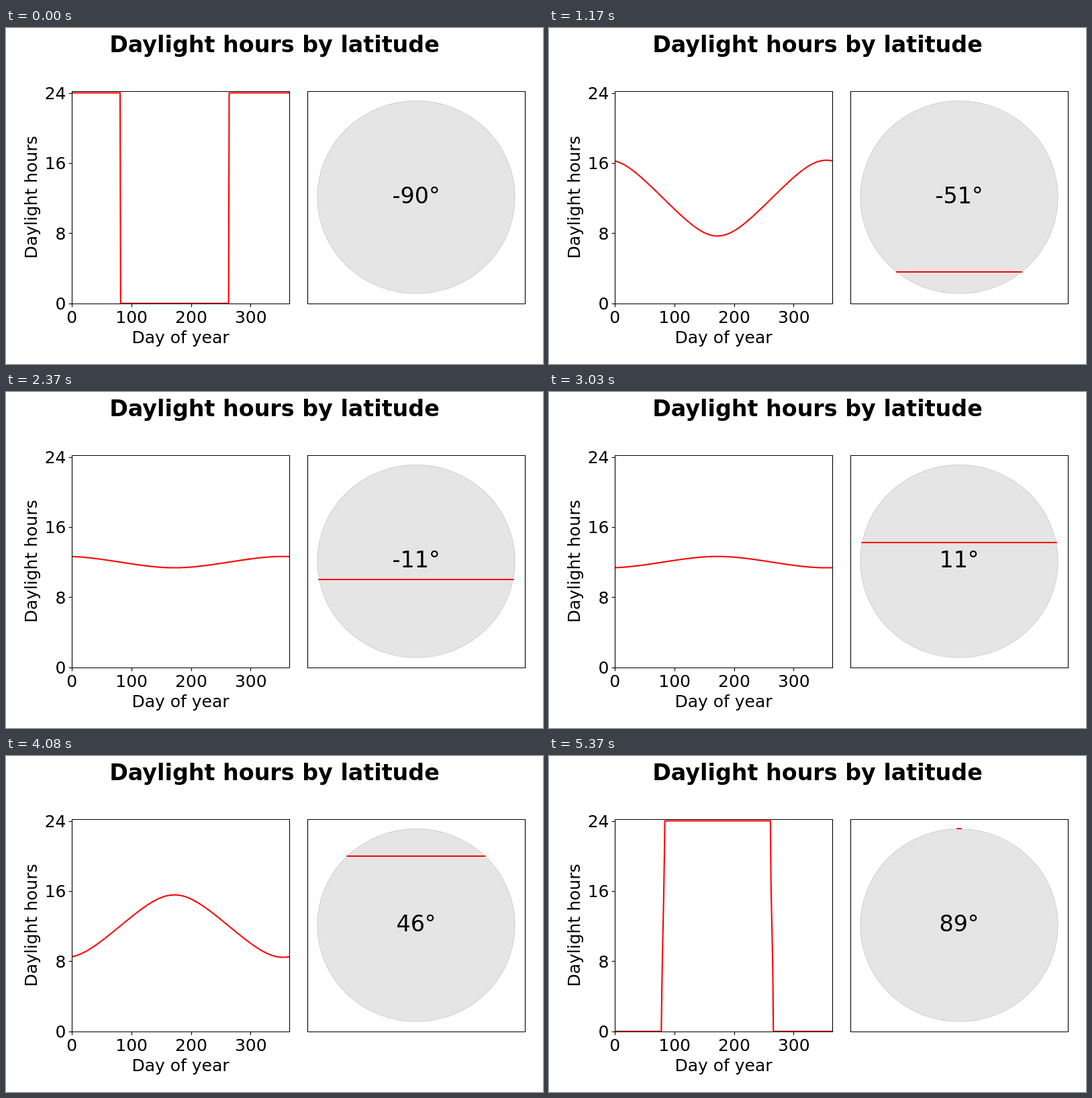
An HTML page with a canvas that plays this animation: 800x500 px, repeating every 5.4 s.

```html
<!DOCTYPE html>
<html lang="en">
<head>
<meta charset="utf-8">
<title>Daylight hours by latitude</title>
<style>
  html, body { margin: 0; width: 100%; height: 100%; overflow: hidden; background: #fff; }
  canvas { display: block; }
</style>
</head>
<body>
<canvas id="stage" width="800" height="500"></canvas>
<script>
const ctx = document.getElementById('stage').getContext('2d', { alpha: false });
const FONT = '"DejaVu Sans", sans-serif';
const STEP = 30, STEPS = 180;
const RAD = Math.PI / 180;
const TILT = 23.45;
const THIN = 1.11, THICK = 2.08;

const plot = { left: 98, right: 422.2, top: 93.94, bottom: 409.72, days: 365, hours: 24.2 };
const globe = { x: 611, y: 251.83, rx: 147.3, ry: 143.54 };

const dayX = d => plot.left + (plot.right - plot.left) * d / plot.days;
const hourY = h => plot.bottom - (plot.bottom - plot.top) * h / plot.hours;
const crisp = v => Math.floor(v + 0.5) + 0.5;

function daylight(lat, day) {
  const decl = TILT * Math.sin(360 / 365 * (284 + day) * RAD);
  const c = -Math.tan(lat * RAD) * Math.tan(decl * RAD);
  return 24 / Math.PI * Math.acos(Math.max(-1, Math.min(1, c)));
}

function label(str, x, y, size, align = 'center', weight = '') {
  ctx.font = `${weight} ${size}px ${FONT}`;
  ctx.textAlign = align;
  ctx.fillStyle = '#000';
  ctx.fillText(str, x, y);
}

function stroke(color, width) {
  ctx.strokeStyle = color;
  ctx.lineWidth = width;
  ctx.stroke();
}

function segment(x1, y1, x2, y2, color, width) {
  ctx.beginPath();
  ctx.moveTo(x1, y1);
  ctx.lineTo(x2, y2);
  stroke(color, width);
}

function box(left, right) {
  ctx.lineJoin = 'miter';
  ctx.beginPath();
  ctx.rect(left, 94.5, right - left, 316);
  stroke('#000', THIN);
}

function drawCurve(lat) {
  ctx.save();
  ctx.beginPath();
  ctx.rect(98, 94, 324, 316);
  ctx.clip();
  ctx.lineJoin = 'round';
  ctx.lineCap = 'square';
  ctx.beginPath();
  for (let d = 0; d <= plot.days; d++) ctx.lineTo(dayX(d), hourY(daylight(lat, d)));
  stroke('#f00', THICK);
  ctx.restore();
}

function drawAxes() {
  ctx.lineCap = 'butt';
  for (const d of [0, 100, 200, 300]) {
    const x = crisp(dayX(d));
    segment(x, 410.5, x, 415.4, '#000', THIN);
    label(d, dayX(d) + 0.3, 439, 25);
  }
  for (const h of [0, 8, 16, 24]) {
    const y = crisp(hourY(h));
    segment(93.6, y, 98.5, y, '#000', THIN);
    label(h, 89.5, Math.round(hourY(h) + 9.2), 25, 'right');
  }
  box(98.5, 422.5);
  label('Day of year', 260, 469, 25);
  ctx.save();
  ctx.translate(46, 252);
  ctx.rotate(-Math.PI / 2);
  label('Daylight hours', 0, 0, 25);
  ctx.restore();
}

function drawGlobe(lat) {
  ctx.beginPath();
  ctx.ellipse(globe.x, globe.y, globe.rx, globe.ry, 0, 0, 2 * Math.PI);
  ctx.fillStyle = 'rgba(0,0,0,0.1)';
  ctx.fill();
  stroke('rgba(0,0,0,0.1)', 1.39);

  if (lat > -90) {
    const half = globe.rx * Math.cos(lat * RAD);
    const y = Math.round(globe.y - globe.ry * Math.sin(lat * RAD));
    ctx.lineCap = 'square';
    segment(globe.x - half, y, globe.x + half, y, '#f00', THICK);
  }
  box(449.5, 773.5);
  label(lat + '°', globe.x, 261, 100 / 3);
}

function draw(now) {
  const lat = Math.floor(now / STEP) % STEPS - 90;
  ctx.fillStyle = '#fff';
  ctx.fillRect(0, 0, 800, 500);
  label('Daylight hours by latitude', 400, 36, 100 / 3, 'center', 'bold');
  drawCurve(lat);
  drawAxes();
  drawGlobe(lat);
}

const start = performance.now();
function tick() {
  draw(performance.now() - start);
  requestAnimationFrame(tick);
}
tick();
</script>
</body>
</html>
```
